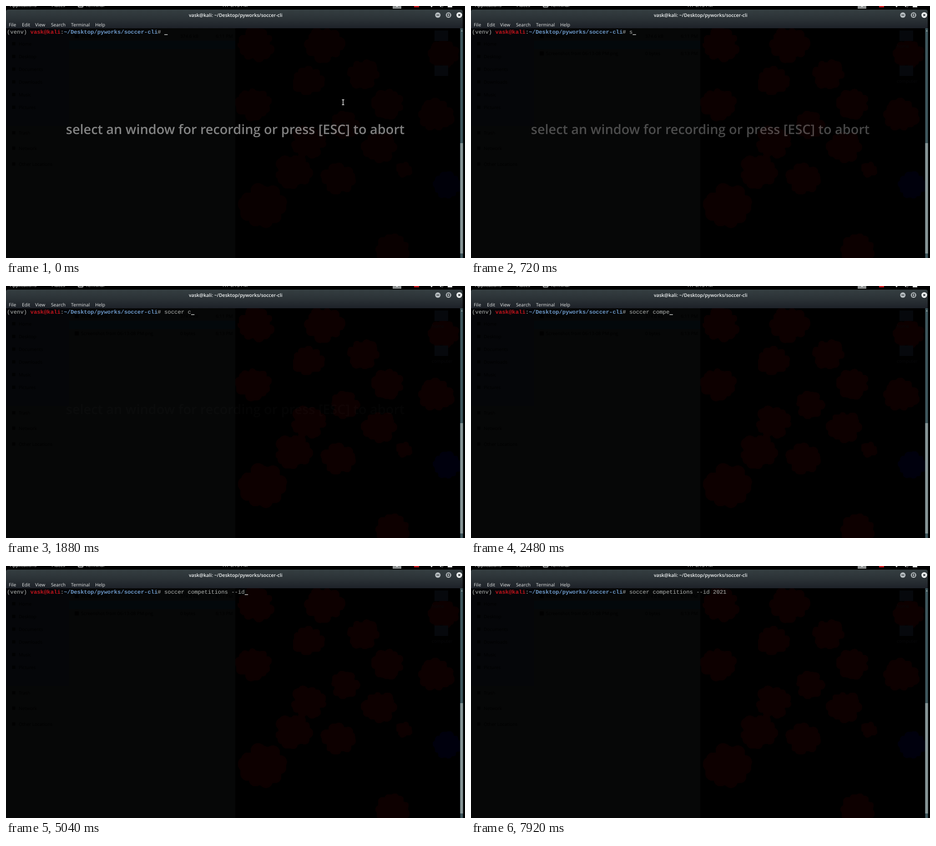
An HTML page that plays this animation: 1009x555 px, repeating every 8000 ms.

```html
<!DOCTYPE html>
<html lang="en">
<head>
<meta charset="utf-8">
<title>Terminal</title>
<style>
html, body { margin: 0; width: 100%; height: 100%; overflow: hidden; background: #000; }
svg { display: block; width: 1009px; height: 555px; }
text { white-space: pre; text-rendering: geometricPrecision; }
.ui { font: 10.2px "Open Sans", "Noto Sans", sans-serif; fill: #e6e8e8; }
.title { font-size: 10.5px; font-weight: 600; fill: #f2f4f4; text-anchor: middle; }
.mono { font: 12.27px "Liberation Mono", "DejaVu Sans Mono", monospace; fill: #b4b7b4; }
.user { font-weight: bold; fill: #c2141c; }
.path { font-weight: bold; fill: #6c98c8; }
.notice { font: 600 28.87px "Open Sans", "Noto Sans", sans-serif; fill: #fff; text-anchor: middle; }
.ghost { font: 10px "Open Sans", "Noto Sans", sans-serif; fill: #010101; }
</style>
</head>
<body>
<svg id="stage" viewBox="0 0 1009 555">
  <defs>
    <linearGradient id="bar" x1="0" y1="0" x2="0" y2="1">
      <stop offset="0" stop-color="#353e41"/>
      <stop offset=".5" stop-color="#2b3236"/>
      <stop offset="1" stop-color="#1d2128"/>
    </linearGradient>
    <filter id="soft"><feGaussianBlur stdDeviation="3"/></filter>
  </defs>
  <rect width="1009" height="555"/>

  <!-- faint desktop behind the terminal -->
  <g id="flowers" filter="url(#soft)"></g>
  <rect y="49" width="504" height="506" fill="#060707"/>
  <rect y="49" width="138" height="215" fill="#050609"/>
  <rect x="138" y="76" width="366" height="19" fill="#03080b"/>
  <g fill="#06080c">
    <rect x="942" y="54" width="30" height="23"/>
    <rect x="942" y="131" width="30" height="23"/>
  </g>
  <g id="side" class="ghost"></g>
  <g class="ghost">
    <rect x="151" y="62" width="9" height="9"/>
    <text x="165" y="70">README.md</text>
    <text x="383" y="70">374.6 kB</text>
    <text x="461" y="70">6:11 PM</text>
    <g id="late">
      <rect x="151" y="100" width="9" height="9"/>
      <text x="165" y="108">Screenshot from 06-13-08 PM.png</text>
      <text x="383" y="108">0 bytes</text>
      <text x="461" y="108">6:13 PM</text>
      <g fill="#08080a">
        <text x="936" y="92">home</text>
        <text x="936" y="169">computer</text>
      </g>
    </g>
  </g>

  <!-- desktop panel, cut off by the top edge -->
  <g class="ui">
    <text x="9" y="2">Applications</text>
    <text x="100" y="2">Places</text>
    <rect x="158.7" y="-6" width="10.6" height="8.3" rx="1.5" fill="none" stroke="#e6e8e8" stroke-width="1.5"/>
    <text x="175" y="2">Terminal</text>
    <text x="476" y="2">Fri  6:13 PM</text>
    <rect x="850" y="-4" width="19" height="10" fill="#8d9090"/>
    <rect x="858" y="0" width="3" height="2" fill="#e6e8e8"/>
    <rect x="897" y="-3" width="11" height="6" fill="#c4141a"/>
    <path d="M933 0h5l-2.5 3z M953 0h4v3z M971 -4h10v7h-10z"/>
    <path d="M959 -2q3 3 0 5" fill="none" stroke="#e6e8e8"/>
  </g>

  <!-- window frame -->
  <path d="M0 49V12Q0 8 5 8H999Q1004 8 1004 12V49Z" fill="url(#bar)"/>
  <text class="ui title" x="504.8" y="24">vask@kali: ~/Desktop/pyworks/soccer-cli</text>
  <g id="menu" class="ui"></g>
  <g fill="none" stroke="#22282b" stroke-width="1.5">
    <circle cx="949.3" cy="20" r="6" fill="#b4babd" stroke="none"/>
    <path d="M946.3 20h6"/>
    <circle cx="972.8" cy="20" r="6" fill="#b4babd" stroke="none"/>
    <rect x="970.3" y="17.5" width="5" height="5"/>
    <circle cx="996.4" cy="20" r="6.2" fill="#f1f3f3" stroke="none"/>
    <path d="M994.2 17.8l4.4 4.4m0-4.4l-4.4 4.4"/>
  </g>
  <rect x="998.5" y="49" width="6" height="506" fill="#3e575d"/>
  <rect x="998.5" y="302" width="6" height="243" fill="#879697"/>
  <path d="M1000 56l2-3 2 3z" fill="#9aa8a9"/>

  <text class="mono" x="2" y="61">(venv) <tspan class="user">vask@kali</tspan>:<tspan class="path">~/Desktop/pyworks/soccer-cli</tspan># <tspan id="typed"></tspan></text>
  <rect id="caret" y="62.4" width="7.4" height="1.3" fill="#e4e6e4"/>
  <text id="notice" class="notice" x="504" y="282">select an window for recording or press [ESC] to abort</text>
  <g id="pointer" fill="none">
    <path d="M738.5 206.5h5M738.5 217.5h5M741 206.5v11" stroke="#000" stroke-width="3.5"/>
    <path d="M738.5 206.5h5M738.5 217.5h5M741 206.5v11" stroke="#eee" stroke-width="1.4"/>
  </g>
</svg>
<script>
const LOOP = 8000, BLINK = 600, CELL = 7.363, START = 348;
const COMMAND = 'soccer competitions --id 2021';
// one key time per character of COMMAND
const KEYS = [640, 800, 960, 1120, 1280, 1440, 1600,
  1800, 1960, 2120, 2280, 2440, 2600, 2760, 2920, 3040, 3200, 3320, 3480, 3640,
  4240, 4400, 4680, 4880, 5160, 5880, 6200, 6800, 7240];
const FADE = [[0, .5], [720, .28], [1360, .12], [1960, 0]];
const $ = id => document.getElementById(id);

function add(parent, tag, attrs, text) {
  const el = document.createElementNS('http://www.w3.org/2000/svg', tag);
  for (const key in attrs) el.setAttribute(key, attrs[key]);
  if (text) el.textContent = text;
  parent.append(el);
}

[['File', 6], ['Edit', 35], ['View', 64], ['Search', 99], ['Terminal', 143], ['Help', 196]]
  .forEach(([label, x]) => add($('menu'), 'text', { x, y: 44.5 }, label));

[['Home', 83], ['Desktop', 111], ['Documents', 139], ['Downloads', 167], ['Music', 195],
  ['Pictures', 223], ['Trash', 279], ['Network', 313], ['Other Locations', 348]]
  .forEach(([label, y]) => {
    add($('side'), 'rect', { x: 13.5, y: y - 3.5, width: 7, height: 7 });
    add($('side'), 'text', { x: 28, y: y + 4 }, label);
  });

let seed = 7;
const random = () => (seed = seed * 16807 % 2147483647) / 2147483647;

// x, y, radius, tint
const TINTS = ['#090403', '#070604', '#050608'];
[[700, 85, 46, 1], [785, 150, 38, 0], [665, 165, 38, 0], [550, 85, 44, 1], [545, 215, 42, 0],
  [840, 216, 38, 1], [745, 262, 34, 0], [665, 300, 42, 1], [945, 240, 42, 0], [820, 310, 40, 0],
  [632, 365, 44, 0], [730, 382, 40, 0], [565, 440, 54, 0], [850, 535, 40, 0], [875, 360, 20, 0],
  [962, 105, 36, 0], [970, 395, 34, 2]].forEach(([x, y, r, tint]) => {
  const fill = TINTS[tint];
  add($('flowers'), 'circle', { cx: x, cy: y, r: r * .7, fill });
  for (let i = 0; i < 11; i++) {
    const angle = (i + random() * .8) * Math.PI * 2 / 11;
    add($('flowers'), 'circle', {
      cx: x + Math.cos(angle) * r * .72, cy: y + Math.sin(angle) * r * .64,
      r: r * (.18 + random() * .14), fill
    });
  }
});

function fadeAt(t) {
  const i = FADE.findIndex(step => step[0] > t);
  if (i < 0) return 0;
  const [t0, a] = FADE[i - 1], [t1, b] = FADE[i];
  return a + (b - a) * (t - t0) / (t1 - t0);
}

function draw() {
  const t = performance.now() % LOOP;
  const count = KEYS.filter(key => key <= t).length;
  const idle = count ? t - KEYS[count - 1] : 0;
  $('typed').textContent = COMMAND.slice(0, count);
  $('caret').setAttribute('x', START + count * CELL);
  $('caret').setAttribute('opacity', idle % (2 * BLINK) < BLINK ? 1 : 0);
  $('notice').setAttribute('opacity', fadeAt(t));
  $('pointer').setAttribute('opacity', count ? 0 : 1);
  $('late').setAttribute('opacity', Math.min(1, t / 700));
  $('flowers').setAttribute('opacity', Math.min(1, .75 + t / 3000));
  requestAnimationFrame(draw);
}
draw();
</script>
</body>
</html>
```
